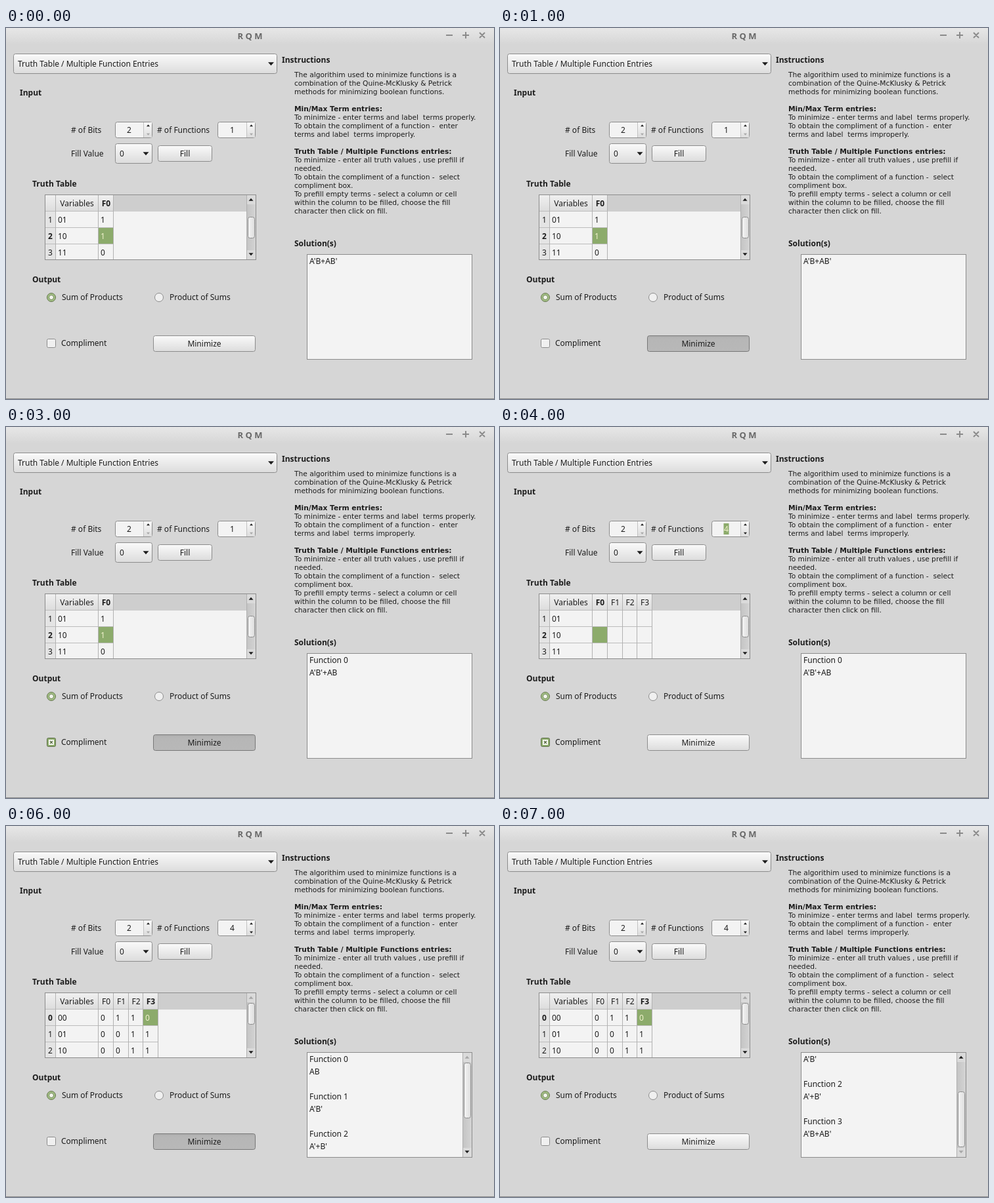
Write an HTML page that moves like this. It is 743 px wide and 566 px high and loops after 8 s.

```html
<!DOCTYPE html>
<html lang="en">
<head>
<meta charset="utf-8">
<title>RQM</title>
<style>
html, body { margin: 0; width: 743px; height: 566px; overflow: hidden; background: #d6d6d6; }
svg { display: block; }
text { font: 12px "Noto Sans", "Open Sans", sans-serif; fill: #1c1c1c; white-space: pre; }
.b { font-weight: 700; }
.mid { text-anchor: middle; }
.title { font-size: 13px; font-weight: 700; fill: #686868; }
.help { font: 10.667px "DejaVu Sans", sans-serif; }
.help.b { font-weight: 700; }
.sel { fill: #f3f3cf; }
</style>
</head>
<body>
<svg id="stage" width="743" height="566" viewBox="0 0 743 566">
  <defs>
    <linearGradient id="bar" x2="0" y2="1"><stop stop-color="#e7e7e7"/><stop offset="1" stop-color="#d6d6d6"/></linearGradient>
    <linearGradient id="btn" x2="0" y2="1"><stop stop-color="#fafafa"/><stop offset="1" stop-color="#dcdcdc"/></linearGradient>
    <linearGradient id="down" x2="0" y2="1"><stop stop-color="#adadad"/><stop offset=".2" stop-color="#b6b6b6"/><stop offset="1" stop-color="#b8b8b8"/></linearGradient>
    <linearGradient id="head" x2="0" y2="1"><stop stop-color="#f0f0f0"/><stop offset="1" stop-color="#dcdcdc"/></linearGradient>
    <linearGradient id="groove"><stop stop-color="#c3c3c3"/><stop offset="1" stop-color="#d4d4d4"/></linearGradient>
    <linearGradient id="thumb"><stop stop-color="#f4f4f4"/><stop offset="1" stop-color="#dedede"/></linearGradient>
    <clipPath id="tableClip"><rect x="60" y="255" width="320" height="98"/></clipPath>
    <clipPath id="listClip"><rect x="459" y="346" width="250" height="159"/></clipPath>
  </defs>
  <g id="fixed"></g>
  <g id="live"></g>
</svg>
<script>
const INK = '#1c1c1c', EDGE = '#8c8c8c', GREEN = '#8cab6b', PALE = '#f3f3f3', DIM = '#a6a6a6';

const rect = (x, y, w, h, fill, stroke, r = 0) =>
  `<rect x="${x}" y="${y}" width="${w}" height="${h}" rx="${r}" fill="${fill}"` +
  (stroke ? ` stroke="${stroke}"` : '') + '/>';
// Crisp one-pixel outline around whole pixel edges
const box = (x, y, w, h, fill, r = 0, stroke = EDGE) => rect(x + .5, y + .5, w - 1, h - 1, fill, stroke, r);
const path = (d, stroke, w = 1) => `<path d="${d}" fill="none" stroke="${stroke}" stroke-width="${w}"/>`;
const circle = (x, y, r, fill, stroke = 'none') =>
  `<circle cx="${x}" cy="${y}" r="${r}" fill="${fill}" stroke="${stroke}"/>`;
const text = (x, y, s, cls = '') => `<text x="${x}" y="${y}" class="${cls}">${s.replace(/&/g, '&amp;')}</text>`;
// Triangle centred at x, y; dir 1 points down, -1 up
const arrow = (x, y, dir, half = 3.5, fill = INK) =>
  `<path d="M${x - half} ${y - dir * half / 2}h${2 * half}L${x} ${y + dir * half / 2 + dir * .5}z" fill="${fill}"/>`;

function spin(x, w, value, atMin, selected) {
  const right = x + w, cx = x + 21.5 + (w - 57);
  return box(x, 143, w, 25, PALE, 3) +
    rect(right - 13, 144, 12, 23, 'url(#btn)') +
    path(`M${right - 13.5} 144v23`, '#c2c2c2') +
    arrow(right - 6.5, 149, -1, 2.5) +
    arrow(right - 6.5, 162, 1, 2.5, atMin ? DIM : INK) +
    (selected ? rect(cx - 4, 147, 8, 17, GREEN) : '') +
    text(cx, 160, value, selected ? 'mid sel' : 'mid');
}

function scrollbar(x, top, bottom, thumbTop, thumbH, atTop, atEnd) {
  return rect(x, top, 14, bottom - top, '#dadada') +
    rect(x, top + 14, 14, bottom - top - 28, 'url(#groove)') +
    path(`M${x + .5} ${top}V${bottom}`, '#b0b0b0') +
    box(x + 2, thumbTop, 11, thumbH, 'url(#thumb)', 3) +
    arrow(x + 7, top + 7, -1, 3.5, atTop ? DIM : INK) +
    arrow(x + 7, bottom - 8, 1, 3.5, atEnd ? DIM : INK);
}

function fixedParts() {
  const help = [
    'The algorithim used to minimize functions is a',
    'combination of the Quine-McKlusky & Petrick',
    'methods for minimizing boolean functions.', '',
    '*Min/Max Term entries:',
    'To minimize - enter terms and label  terms properly.',
    'To obtain the compliment of a function -  enter',
    'terms and label  terms improperly.', '',
    '*Truth Table / Multiple Functions entries:',
    'To minimize - enter all truth values , use prefill if',
    'needed.',
    'To obtain the compliment of a function -  select',
    'compliment box.',
    'To prefill empty terms - select a column or cell',
    'within the column to be filled, choose the fill',
    'character then click on fill.'
  ];
  const heads = [[21, 103, 'Input'], [40, 242, 'Truth Table'], [40, 388, 'Output'],
    [420, 53, 'Instructions'], [439, 333, 'Solution(s)']];
  const labels = [[99, 160, '# of Bits'], [230, 160, '# of Functions'], [99, 196, 'Fill Value'],
    [85, 415, 'Sum of Products'], [249, 415, 'Product of Sums'], [84, 485, 'Compliment']];
  return rect(0, 0, 743, 566, '#d6d6d6') + rect(0, 0, 743, 25, 'url(#bar)') +
    path('M0 565.5H743', '#8a8a8a') +
    text(371.5, 17, 'R Q M', 'title mid') +
    path('M670 11h10M695 11h10M700 6v10M721 7l8 8M729 7l-8 8', '#8b8b8b', 2) +
    box(11, 39, 402, 31, 'url(#btn)', 3) + text(18, 59, 'Truth Table / Multiple Function Entries') +
    arrow(403.5, 54.5, 1, 4.5) +
    heads.map(h => text(...h, 'b')).join('') + labels.map(l => text(...l)).join('') +
    help.map((s, i) => text(439, 75 + 13 * i, s.replace('*', ''), s[0] === '*' ? 'help b' : 'help')).join('') +
    spin(166, 57, '2', true) +
    box(166, 176, 57, 31, 'url(#btn)', 3) + text(173, 196, '0') + arrow(213, 191.5, 1, 4.5) +
    box(231, 179, 83, 25, 'url(#btn)', 3) + text(272.5, 196, 'Fill', 'mid') +
    circle(69, 411, 6.5, '#a3c084', '#65754f') + circle(69, 411, 3.5, '#f4f6ee', '#71865a') +
    circle(233, 411, 6.5, '#f0f0f0', EDGE);
}

const edges = [140.5, 163.5, 186.5, 208.5, 231.5];
const bits = ['00', '01', '10', '11'];

// cols: one string of four truth values per function; sel: [row, column]
function table({ cols, first, sel }) {
  const end = edges[cols.length];
  let out = rect(60, 255, 320, 98, PALE) + rect(60, 255, 306, 25, '#cecece') +
    rect(60, 255, end - 60, 25, 'url(#head)') + rect(60, 280, 15, 73, '#e4e4e4') +
    text(108, 272, 'Variables', 'mid');
  cols.forEach((c, j) => {
    out += text((edges[j] + edges[j + 1]) / 2 + .5, 272, 'F' + j, j === sel[1] ? 'b mid' : 'mid');
  });
  for (let k = 0; k < 3; k++) {
    const row = first + k, y = 280 + 25 * k;
    out += text(67.5, y + 17, String(row), row === sel[0] ? 'b mid' : 'mid') + text(79, y + 17, bits[row]);
    cols.forEach((c, j) => {
      const on = row === sel[0] && j === sel[1];
      if (on) out += rect(edges[j] + .5, y, edges[j + 1] - edges[j] - 1, 24, GREEN);
      out += text(edges[j] + 3.5, y + 17, c[row] || '', on ? 'sel' : '');
    });
  }
  out += path(`M60 304.5H${end}M60 329.5H${end}M60 279.5H${end}`, '#bcbcbc') +
    path('M75.5 255V353' + edges.slice(0, cols.length + 1).map(x => `M${x} 255V353`).join(''), '#b2b2b2') +
    scrollbar(366, 255, 353, first ? 288 : 270, 33, !first, false);
  return `<g clip-path="url(#tableClip)">${out}</g>` + box(59, 254, 322, 100, 'none');
}

function solutions({ lines, skip = 0 }) {
  const long = lines.length > 8;
  return box(458, 345, 252, 161, PALE) + '<g clip-path="url(#listClip)">' +
    lines.map((s, i) => text(462, 360 + 19 * (i - skip), s)).join('') +
    (long ? scrollbar(695, 346, 505, skip ? 405 : 361, 85, !skip, skip) : '') + '</g>';
}

function checkbox(on) {
  if (!on) return box(62, 474, 14, 14, '#f0f0f0', 2);
  return box(62, 474, 14, 14, GREEN, 2, '#5f704b') + rect(65, 477, 8, 8, '#fafcf6') +
    path('M67 479l4 4M71 479l-4 4', '#566940', 1.4);
}

function live(s) {
  const n = s.cols.length;
  return spin(322, 58, String(n), n === 1, s.edit) + table(s) + checkbox(s.check) +
    box(224, 469, 156, 25, s.press ? 'url(#down)' : 'url(#btn)', 3, s.press ? '#777' : EDGE) +
    text(302, 486, 'Minimize', 'mid') + solutions(s);
}

const xor = { cols: ['0110'], first: 1, sel: [2, 0], lines: ["A'B+AB'"] };
const inverse = ['Function 0', "A'B'+AB"];
const blank = { cols: ['', '', '', ''], first: 1, sel: [2, 0], lines: inverse, check: true, edit: true };
const filled = { cols: ['0001', '1000', '1110', '0110'], first: 0, sel: [0, 3], lines: inverse };
const all = ['Function 0', 'AB', '', 'Function 1', "A'B'", '', 'Function 2', "A'+B'", '', 'Function 3', "A'B+AB'"];

// One state per second
const states = [
  xor,
  { ...xor, press: true },
  { ...xor, check: true, lines: ['Function 0', "A'B+AB'"] },
  { ...xor, check: true, press: true, lines: inverse },
  blank,
  filled,
  { ...filled, press: true, lines: all },
  { ...filled, lines: all, skip: 4 }
];

const layer = document.getElementById('live');
document.getElementById('fixed').innerHTML = fixedParts();
let shown = -1;
function draw(now) {
  const i = Math.floor(now % 8000 / 1000);
  if (i !== shown) layer.innerHTML = live(states[shown = i]);
}
const start = performance.now();
function tick() {
  draw(performance.now() - start);
  requestAnimationFrame(tick);
}
tick();
</script>
</body>
</html>
```
